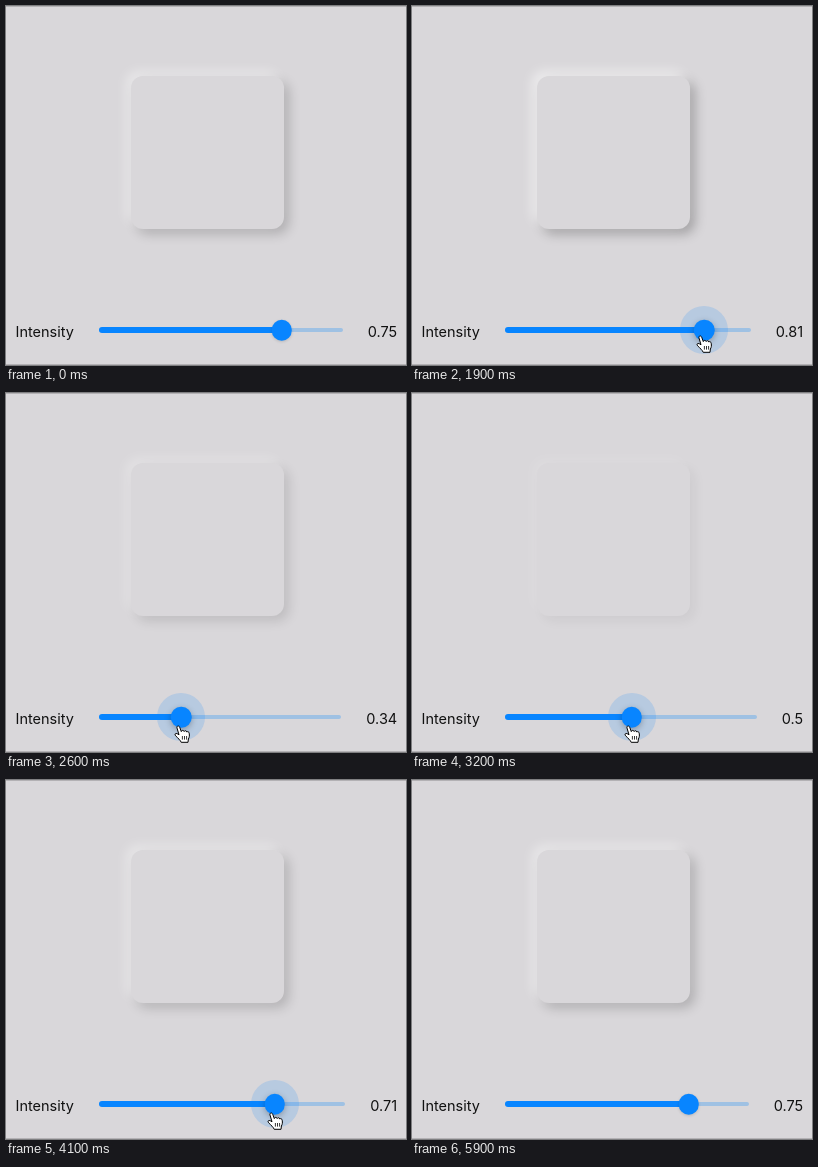
An HTML page for the animation above (6100 ms loop, 400 by 359 pixels).

```html
<!DOCTYPE html>
<html lang="en">
<head>
<meta charset="utf-8">
<title>Intensity slider</title>
<style>
  html, body { margin: 0; height: 100%; overflow: hidden; background: #d9d7da; }
  #stage {
    position: relative; width: 400px; height: 359px; box-sizing: border-box; overflow: hidden;
    border: solid #b3b1b4; border-width: 1px 0;
    font: 14.5px/17px Inter, Roboto, sans-serif; color: #111;
  }
  #stage * { position: absolute; }
  #card { left: 124.5px; top: 69px; width: 153px; height: 153px; border-radius: 12px; background: #d9d7da; }
  #stage #row { left: 9.5px; right: 8.8px; top: 316px; height: 17px; display: flex; }
  #stage #row > * { position: relative; }
  #label { width: 83.5px; }
  #slider { flex: 1; margin-right: 25px; }
  #rail, #fill { left: 0; border-radius: 3px; }
  #rail { right: 0; top: 5px; height: 4px; background: #9fc1e3; }
  #fill { top: 4px; height: 6px; background: #0885ff; }
  #halo, #thumb { border-radius: 50%; transform: translate(-50%, -50%); top: 7px; }
  #halo { width: 48px; height: 48px; background: rgba(10, 132, 255, .16); }
  #thumb { width: 20.5px; height: 20.5px; background: #0885ff; }
  #hand { width: 18px; height: 19px; overflow: visible; }
</style>
</head>
<body>
<div id="stage">
  <div id="card"></div>
  <div id="row">
    <span id="label">Intensity</span>
    <div id="slider">
      <div id="rail"></div>
      <div id="halo"></div>
      <div id="fill"></div>
      <div id="thumb"></div>
      <svg id="hand" viewBox="0 0 18 19" stroke="#000" stroke-linejoin="round">
        <path fill="#fff" d="M5 9.8L3 3C2.4.8 5 .2 5.7 2.2L7.3 6.6C7.5 5 9.8 5 10.2 6.5C10.6 5.3 12.5 5.5 12.8 7C13.6 6.2 15 6.8 15.2 8.2C15.6 11 15.4 12 14.4 14L14 17.3H7.2C6.5 15.3 4 13.2 1.6 10.8C.2 9.2 1.6 7.9 3.2 8.7Z"/>
        <path fill="none" stroke-width=".8" d="M8.4 11v3.6M10.5 11v3.6M12.6 11v3.6"/>
      </svg>
    </div>
    <span id="value"></span>
  </div>
</div>
<script>
const LOOP = 6100, STEP = 100, SHADOW_LAG = 300;
const [card, slider, fill, halo, thumb, hand, value] =
  ['card', 'slider', 'fill', 'halo', 'thumb', 'hand', 'value'].map(id => document.getElementById(id));

const ramp = (t, from, to) => Math.min(1, Math.max(0, (t - from) / (to - from)));
const ease = (t, from, to) => (1 - Math.cos(Math.PI * ramp(t, from, to))) / 2;

// Turning points of the drag: [time in ms, intensity].
const turns = [[300, .75], [1420, .973], [2950, .25], [3400, .68], [4900, .754]];
const level = t => turns.slice(1).reduce(
  (v, [end, to], i) => v + (to - turns[i][1]) * ease(t, turns[i][0], end), turns[0][1]);

function draw(t) {
  const v = level(t);
  const press = ramp(t, 200, 400) - ramp(t, 5100, 5300);
  value.textContent = +v.toFixed(2);

  const x = v * slider.getBoundingClientRect().width;
  fill.style.width = halo.style.left = thumb.style.left = x + 'px';
  halo.style.opacity = press;
  thumb.style.boxShadow = `0 ${1 + press}px ${3 + 3 * press}px rgba(0,0,0,${.15 + .12 * press})`;

  const drift = ease(t, 1000, 2400);
  hand.style.display = t >= 300 && t < 5500 ? 'block' : 'none';
  hand.style.left = x - 10.5 + 3 * drift + 'px';
  hand.style.top = 4 + 11 * drift + 'px';

  const depth = level(t - SHADOW_LAG) ** 1.2;
  card.style.boxShadow =
    `-5px -5px 12px rgba(255,255,255,${.58 * depth}), 5px 5px 12px rgba(0,0,0,${.27 * depth})`;
}

const start = performance.now();
function tick() {
  const t = (performance.now() - start) % LOOP;
  draw(Math.floor(t / STEP) * STEP);
  requestAnimationFrame(tick);
}
tick();
</script>
</body>
</html>
```
